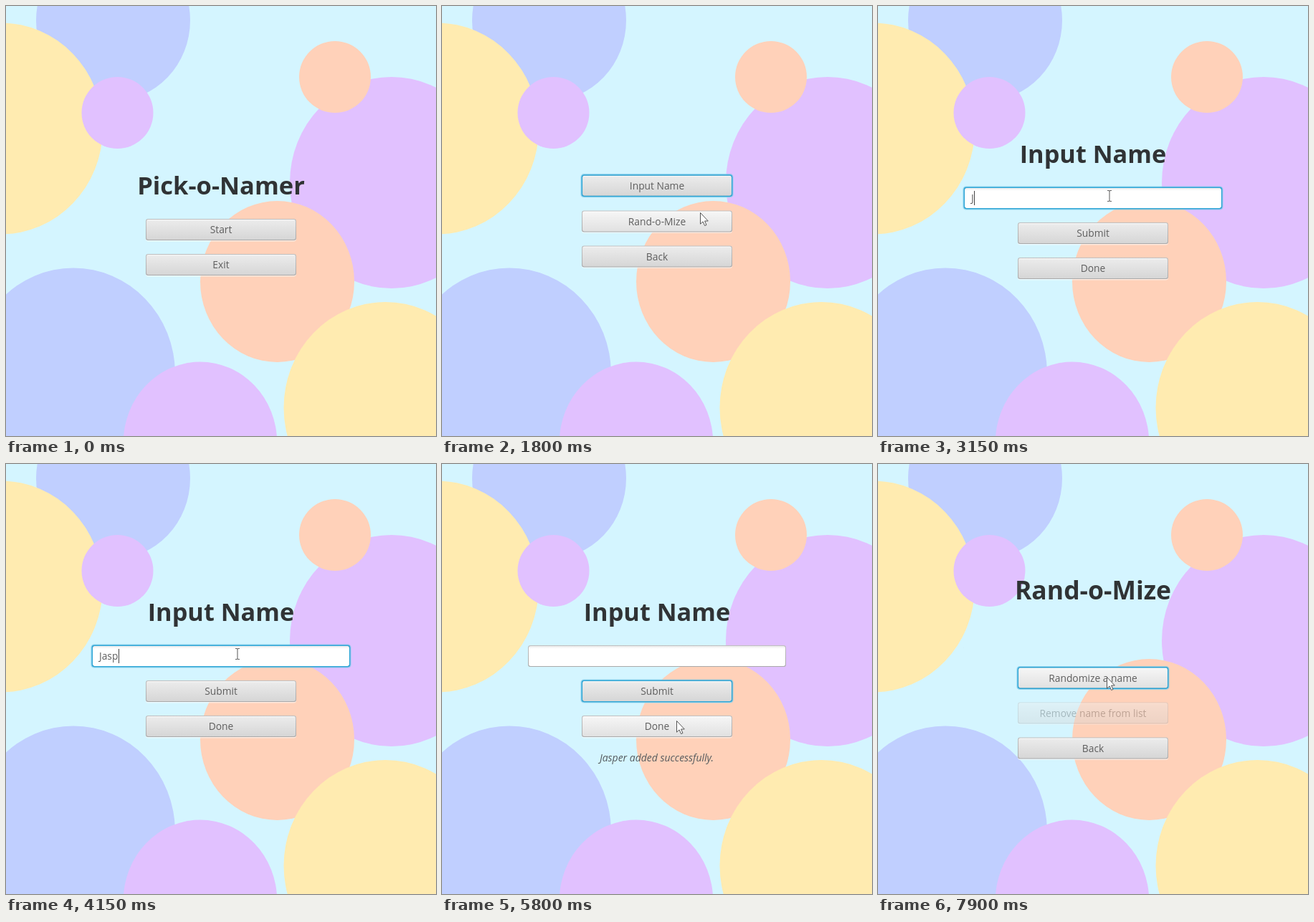
Write an HTML page that moves like this. It is 600x600 px and loops after 8 s.

```html
<!DOCTYPE html>
<html lang="en">
<head>
<meta charset="utf-8">
<title>Name picker</title>
<style>
  html, body { margin: 0; width: 100%; height: 100%; overflow: hidden; background: #d4f5ff; }
  svg { display: block; width: 100%; height: 100%; }
  text { font-family: "Open Sans", "Noto Sans", sans-serif; font-size: 13.8px; fill: #5e5e5e; }
  .mid { text-anchor: middle; }
  .title { font-weight: 700; fill: #303335; }
  .note { font-style: italic; font-size: 14px; fill: #555b5e; }
</style>
</head>
<body>
<svg id="stage" viewBox="0 0 600 600">
  <defs>
    <linearGradient id="plain" x2="0" y2="1"><stop stop-color="#ececec"/><stop offset="1" stop-color="#d6d6d6"/></linearGradient>
    <linearGradient id="hover" x2="0" y2="1"><stop stop-color="#f6f6f6"/><stop offset="1" stop-color="#e1e1e1"/></linearGradient>
    <linearGradient id="press" x2="0" y2="1"><stop stop-color="#cfcfcf"/><stop offset="1" stop-color="#dcdcdc"/></linearGradient>
    <linearGradient id="edge" x2="0" y2="1"><stop stop-color="#bfbfbf"/><stop offset="1" stop-color="#a9a9a9"/></linearGradient>
    <linearGradient id="well" x2="0" y2="1"><stop stop-color="#ececec"/><stop offset=".14" stop-color="#fff"/></linearGradient>
  </defs>
</svg>
<script>
const LOOP = 8000, STEP = 50;
const stage = document.getElementById('stage');

function add(parent, tag, attrs, text) {
  const el = document.createElementNS('http://www.w3.org/2000/svg', tag);
  for (const k in attrs) el.setAttribute(k, attrs[k]);
  if (text !== undefined) el.textContent = text;
  parent.append(el);
  return el;
}
const show = (el, on) => el.setAttribute('display', on ? 'inline' : 'none');

// Background: cx, cy, rx, ry, colour
const BLUE = '#c0cfff', YELLOW = '#ffebb0', PURPLE = '#e1c1ff', ORANGE = '#ffd1b9';
add(stage, 'rect', { width: 600, height: 600, fill: '#d4f5ff' });
[
  [149.5, 20, 107.5, 112.5, BLUE],
  [-7, 171, 142, 147.5, YELLOW],
  [155.5, 149, 50, 50, PURPLE],
  [538, 246.5, 142, 147.5, PURPLE],
  [459, 99, 50, 50, ORANGE],
  [378.5, 384.5, 107.5, 112.5, ORANGE],
  [94, 513, 142, 147.5, BLUE],
  [271, 609, 107.2, 112.5, PURPLE],
  [529.5, 560.5, 142, 147.5, YELLOW]
].forEach(([cx, cy, rx, ry, fill]) => add(stage, 'ellipse', { cx, cy, rx, ry, fill }));

const pages = {}, controls = {};

function makePage(name, title, size, baseline) {
  const g = pages[name] = add(stage, 'g', {});
  if (title) add(g, 'text', { class: 'mid title', x: 300, y: baseline, style: `font-size:${size}px` }, title);
  return g;
}

// Rounded box with a focus ring
function makeBox(g, name, x, y, w, h, fill) {
  const frame = (d, attrs) =>
    add(g, 'rect', { x: x + d, y: y + d, width: w - 2 * d, height: h - 2 * d, rx: 3.5 - d / 2, ...attrs });
  const edge = frame(.5, { fill: 'url(#edge)' });
  const body = frame(1.5, { fill });
  const ring = add(g, 'g', {});
  g.lastChild === ring && [
    [-.4, '#7ccbea', 1.4, .7],
    [.8, '#2fa6d6', 1.5, 1]
  ].forEach(([d, stroke, sw, opacity]) => {
    ring.append(frame(d, { fill: 'none', stroke, 'stroke-width': sw, opacity }));
  });
  return controls[name] = { x, y, w, h, edge, body, ring };
}

function makeButton(page, name, label, mid, off) {
  const g = add(pages[page], 'g', off ? { opacity: .4 } : {});
  add(g, 'rect', { x: 195, y: mid - 14, width: 210, height: 30.5, rx: 3.5, fill: '#fff', opacity: .55 });
  const box = makeBox(g, name, 194.5, mid - 15.5, 211, 31, 'url(#plain)');
  add(g, 'rect', { x: 197, y: mid - 13.7, width: 206, height: 1, fill: '#fff', opacity: .6 });
  add(g, 'text', { class: 'mid', x: 300, y: mid + 5 }, label);
  Object.assign(box, { page, button: !off });
}

makePage('home', 'Pick-o-Namer', 34.5, 263);
makeButton('home', 'start', 'Start', 312);
makeButton('home', 'exit', 'Exit', 361);

makePage('menu');
makeButton('menu', 'input', 'Input Name', 250.7);
makeButton('menu', 'mize', 'Rand-o-Mize', 300.5);
makeButton('menu', 'menuBack', 'Back', 349.5);

const form = makePage('form', 'Input Name', 34.3, 219);
const field = makeBox(form, 'field', 119.5, 252.5, 361, 31, 'url(#well)');
field.page = 'form';
const typed = add(form, 'text', { x: 130, y: 273 }, '');
const caret = add(form, 'rect', { y: 258, width: 1, height: 20, fill: '#444' });
makeButton('form', 'submit', 'Submit', 317);
makeButton('form', 'done', 'Done', 366);
const NAME = 'Jasper';
const note = add(form, 'text', { class: 'mid note', x: 299.5, y: 414.5 }, NAME + ' added successfully.');

makePage('pick', 'Rand-o-Mize', 35.5, 189);
makeButton('pick', 'draw', 'Randomize a name', 298.5);
makeButton('pick', 'remove', 'Remove name from list', 347.5, true);
makeButton('pick', 'pickBack', 'Back', 396.5);

const arrow = add(stage, 'path', {
  d: 'M.5 .5V16.2L4.1 12.9 6.6 18.5 9 17.5 6.6 12H11.3Z',
  fill: '#fff', stroke: '#555', 'stroke-width': 1, 'stroke-linejoin': 'round'
});
const beam = add(stage, 'path', {
  d: 'M-3 -7.5H-1L0 -6.8 1 -7.5H3M0 -6.8V6.8M-3 7.5H-1L0 6.8 1 7.5H3',
  fill: 'none', stroke: '#666', 'stroke-width': 1.1
});

// Timeline: [start, value]
const PAGE = [[0, 'home'], [1400, 'menu'], [2100, 'form'], [6100, 'menu'], [7000, 'pick']];
const FOCUS = [[0, ''], [450, 'start'], [1400, 'input'], [2100, 'field'], [5200, 'submit'],
  [6050, 'done'], [6100, 'input'], [6950, 'mize'], [7000, 'draw']];
const PRESS = [[0, ''], [1350, 'start'], [1400, ''], [2050, 'input'], [2100, ''], [5200, 'submit'],
  [5250, ''], [6050, 'done'], [6100, ''], [6950, 'mize'], [7000, '']];
const CARET = [[0, 0], [2100, 1], [2600, 0], [3100, 1], [3650, 0], [3900, 1], [4900, 0]];
const LETTERS = [[0, 0], [3100, 1], [3900, 2], [4000, 3], [4150, 4], [4300, 5], [4400, 6], [5250, 0]];
const NOTE = [[0, 0], [5250, 1], [6100, 0]];

// Pointer: [time, x, y]
const PATH = [[850, 574, 231], [950, 490, 262], [1050, 395, 295], [1150, 362, 304],
  [1700, 362, 304], [1800, 360, 288], [1900, 359, 267], [2000, 359, 257], [2200, 359, 257],
  [2450, 361, 266], [3050, 361, 266], [3150, 323, 265], [4600, 323, 265], [4700, 324, 275],
  [4800, 328, 298], [4900, 331, 312], [5500, 331, 312], [5600, 329, 326], [5700, 327, 349],
  [5800, 327, 358], [6350, 327, 358], [6450, 326, 346], [6600, 322, 316], [6700, 321, 309],
  [7650, 321, 309], [7800, 320, 300], [7900, 319, 297]];

function at(steps, t) {
  let value;
  for (const [start, v] of steps) if (t >= start) value = v;
  return value;
}

function pointer(t) {
  const i = PATH.findIndex(p => p[0] > t);
  if (i === 0) return null;
  if (i < 0) return PATH[PATH.length - 1].slice(1);
  const [t0, x0, y0] = PATH[i - 1], [t1, x1, y1] = PATH[i];
  const k = (t - t0) / (t1 - t0);
  return [x0 + (x1 - x0) * k, y0 + (y1 - y0) * k];
}

function draw(t) {
  const page = at(PAGE, t), focus = at(FOCUS, t), press = at(PRESS, t), pos = pointer(t);
  const over = c => pos && c.page === page &&
    pos[0] >= c.x && pos[0] <= c.x + c.w && pos[1] >= c.y && pos[1] <= c.y + c.h;

  for (const name in pages) show(pages[name], name === page);
  for (const name in controls) {
    const c = controls[name];
    show(c.ring, name === focus);
    if (c.button) {
      const look = name === press ? 'press' : over(c) ? 'hover' : 'plain';
      c.body.setAttribute('fill', `url(#${look})`);
    }
  }

  typed.textContent = NAME.slice(0, at(LETTERS, t));
  show(caret, at(CARET, t));
  if (page === 'form') {
    const width = typed.textContent ? typed.getComputedTextLength() : 0;
    caret.setAttribute('x', Math.round(130 + width + .5));
  }
  show(note, at(NOTE, t));

  const inField = over(field);
  show(arrow, pos && !inField);
  show(beam, pos && inField);
  if (pos) (inField ? beam : arrow).setAttribute('transform', `translate(${pos[0]} ${pos[1]})`);
}

const began = performance.now();
function tick() {
  const t = (performance.now() - began) % LOOP;
  draw(Math.floor(t / STEP) * STEP);
  requestAnimationFrame(tick);
}
tick();
</script>
</body>
</html>
```
